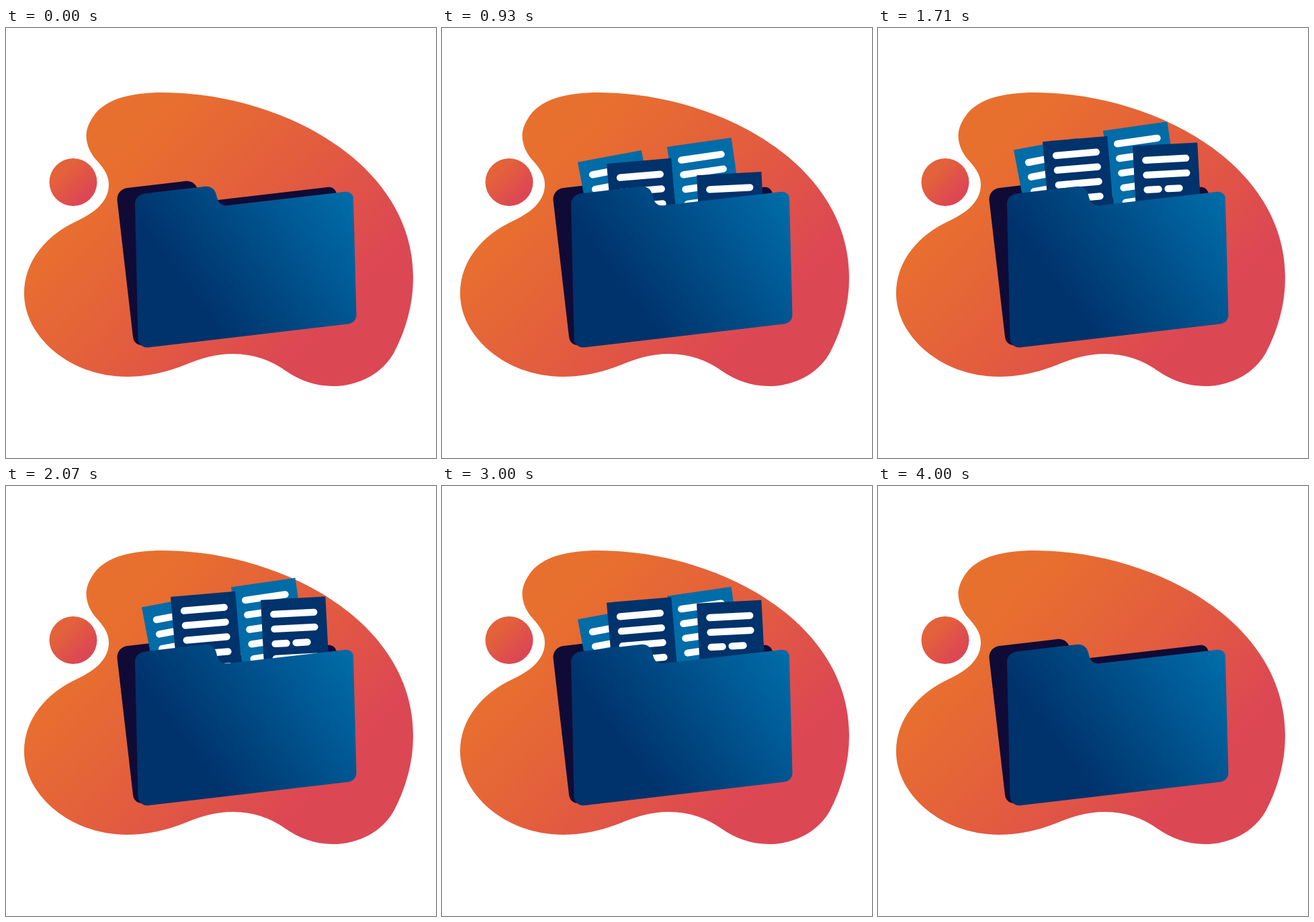
Recreate the animation shown at these times as an HTML page. Size 640 by 640 pixels, loop 4070 ms.

```html
<!DOCTYPE html>
<html>
<head>
<meta charset="utf-8">
<style>
  html, body { margin: 0; height: 100%; overflow: hidden; background: #fff; }
  svg { display: block; width: 100%; height: 100%; }
</style>
</head>
<body>
<svg viewBox="0 0 640 640">
  <defs>
    <linearGradient id="warm" gradientUnits="userSpaceOnUse" x1="185" y1="170" x2="475" y2="440">
      <stop offset="0" stop-color="#e8702e"/>
      <stop offset=".5" stop-color="#e35d3e"/>
      <stop offset="1" stop-color="#dc4754"/>
    </linearGradient>
    <linearGradient id="dot" gradientUnits="userSpaceOnUse" x1="84" y1="214" x2="119" y2="250">
      <stop offset="0" stop-color="#e4623a"/>
      <stop offset="1" stop-color="#dc4754"/>
    </linearGradient>
    <linearGradient id="cool" gradientUnits="userSpaceOnUse" x1="275" y1="400" x2="500" y2="235">
      <stop offset="0" stop-color="#00326b"/>
      <stop offset="1" stop-color="#006ca8"/>
    </linearGradient>
  </defs>
  <path fill="url(#warm)" d="M232 96C405 96 606 198 606 372C606 410 596 448 577 484C560 514 525 533 487 533
    C460 533 436 524 416 510C393 494 368 485 338 485C312 485 288 492 265 502C239 512 211 519 180 519
    C96 519 27 460 27 395C27 347 60 308 106 287C132 275 153 258 153 233C153 217 143 206 134 196
    C126 187 119.500 174 119.500 160C119.500 150 124 140 131 130C150 104 190 96 232 96Z"/>
  <circle cx="100" cy="229.500" r="35.500" fill="url(#dot)"/>
  <path fill="#0f0b36" d="M165.500 256C165 246 172 239 181 238L266 228C275 227 281 231 284 237L292 258.700
    L478 237C486 236 490 240 492 246L505 300L510 430L205 472C196 473 190 468 189 460Z"/>
  <g id="sheets"></g>
  <path fill="url(#cool)" d="M192 262C192 253 199 247 209 246L295 236C305 235 311 240 313 248
    C315 258 319 265.500 330 264L503 244C512 243 517 248 517 254L521.500 427C521.500 435 516 439.500 509 440.500
    L211 475.500C203 476 197 470 196.500 463Z"/>
</svg>
<script>
const LOOP = 4070, STEPS = 57;
const LIGHT = '#006ca8', NAVY = '#00326b';

// x, y: top-left corner when fully out; mid: time in s when fully out
const sheets = [
  { x: 202, y: 180.3, angle: -10.7, mid: 1.975, color: LIGHT },
  { x: 335, y: 150.5, angle: -8.2, mid: 2.09, color: LIGHT },
  { x: 245, y: 164.8, angle: -4.9, mid: 2.22, color: NAVY },
  { x: 379, y: 168.8, angle: -3, mid: 2.34, color: NAVY, split: true }
];

function sheetMarkup(s) {
  let lines = '';
  for (let i = 0; i < 5; i++) {
    lines += `M18.2 ${22.3 + 22 * i}` + (s.split && i === 2 ? 'h17m14 0h17' : 'h60');
  }
  return `<g><path fill="${s.color}" d="M0 0H96.5V120H0Z"/>
    <path d="${lines}" fill="none" stroke="#fff" stroke-width="10.3" stroke-linecap="round"/></g>`;
}

const group = document.getElementById('sheets');
group.innerHTML = sheets.map(sheetMarkup).join('');

// How far a sheet has sunk into the folder, dt seconds from its highest point
const depth = dt => Math.min(120, 4.24 * (Math.cosh(2.3 * dt) - 1));

function draw(now) {
  const step = Math.floor((now % LOOP + 2) / LOOP * STEPS);
  const t = step * LOOP / STEPS / 1000;
  sheets.forEach((s, i) => {
    const y = s.y + depth(t - s.mid);
    group.children[i].setAttribute('transform', `translate(${s.x} ${y}) rotate(${s.angle})`);
  });
}

const start = performance.now();
function tick() {
  draw(performance.now() - start);
  requestAnimationFrame(tick);
}
tick();
</script>
</body>
</html>
```
